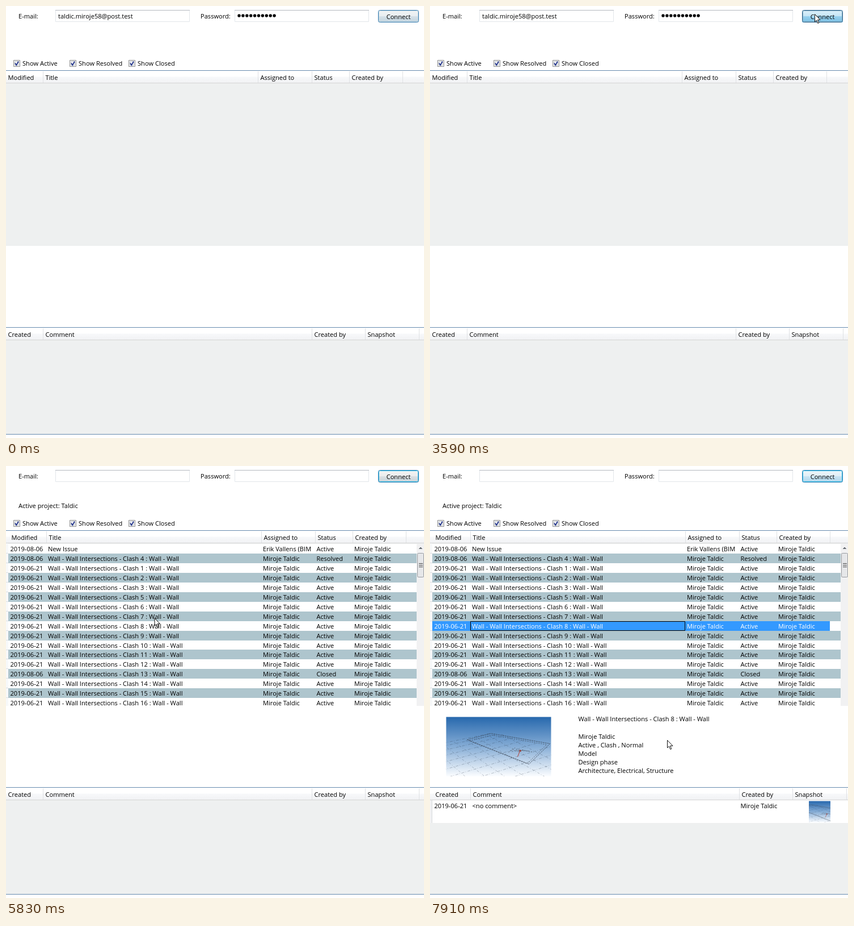
An HTML page with a canvas for the animation above (7.99 s loop, 737x760 px).

```html
<!DOCTYPE html>
<html lang="en">
<head>
<meta charset="utf-8">
<title>Issue list</title>
<style>
html, body { margin: 0; width: 100%; height: 100%; overflow: hidden; background: #fff; }
canvas { display: block; }
</style>
</head>
<body>
<canvas id="stage" width="737" height="760"></canvas>
<script>
const ctx = document.getElementById('stage').getContext('2d');
const LOOP = 7990, LOADED = 3750, SELECTED = 7110, RESIZED = 7190;
const PERSON = 'Miroje Taldic';
const ROW = 17, LINE = '#688caf', EMPTY = '#eef0f0';

const ramp = (t, from, to) => Math.min(1, Math.max(0, (t - from) / (to - from)));
const easeOut = f => 1 - (1 - f) ** 3;

function pointerAt(t) {
  let x = 688, y = 596;
  const move = (from, to, toX, toY, bow = 0) => {
    const f = easeOut(ramp(t, from, to));
    x += (toX - x) * f - bow * Math.sin(Math.PI * f);
    y += (toY - y) * f;
  };
  move(390, 1670, 678, 14, 86);
  move(4230, 5190, 271, 241);
  move(5430, 6710, 257, 280);
  move(7350, 7910, 418, 482);
  return [x, y];
}

// Hover fades in, then the default-button pulse takes over
const glow = t => .2 * (1 - ramp(t, 0, 230)) + ramp(t, 1750, 1990)
  - .35 * ramp(t, 4230, 4630) - .65 * ramp(t, 5430, 5590) + .65 * ramp(t, 6230, 6710);
const press = t => t < LOADED ? ramp(t, 2790, 2950) : 0;

function box(x, y, w, h, fill) {
  ctx.fillStyle = fill;
  ctx.fillRect(x, y, w, h);
}

function frame(x, y, w, h, color, radius = 0) {
  ctx.beginPath();
  ctx.roundRect(x + .5, y + .5, w - 1, h - 1, radius);
  ctx.strokeStyle = color;
  ctx.lineWidth = 1;
  ctx.stroke();
}

function text(s, x, y, color = '#000') {
  ctx.fillStyle = color;
  ctx.fillText(s, x, y);
}

function dot(x, y, r, color) {
  ctx.beginPath();
  ctx.arc(x, y, r, 0, 7);
  ctx.fillStyle = color;
  ctx.fill();
}

function polyline(points, color, width, dash = []) {
  ctx.beginPath();
  points.forEach(([x, y]) => ctx.lineTo(x, y));
  ctx.setLineDash(dash);
  ctx.strokeStyle = color;
  ctx.lineWidth = width;
  ctx.stroke();
  ctx.setLineDash([]);
}

function gradient(y, h, stops) {
  const g = ctx.createLinearGradient(0, y, 0, y + h);
  stops.forEach(([at, color]) => g.addColorStop(at, color));
  return g;
}

function clipped(x, y, w, h, draw) {
  ctx.save();
  ctx.beginPath();
  ctx.rect(x, y, w, h);
  ctx.clip();
  draw();
  ctx.restore();
}

function input(x) {
  box(x, 7, 237, 21, '#fff');
  frame(x, 7, 237, 21, '#e2e6ea');
  box(x, 7, 237, 1, '#b4b8bf');
}

function buttonSkin(alpha, a, b, c, d) {
  ctx.globalAlpha = alpha;
  ctx.beginPath();
  ctx.roundRect(656, 7, 72, 22, 3);
  ctx.fillStyle = gradient(8, 20, [[0, a], [.5, b], [.5, c], [1, d]]);
  ctx.fill();
  ctx.globalAlpha = 1;
}

function button(t) {
  const pressed = press(t) > 0;
  buttonSkin(1, '#f3f3f3', '#ebedee', '#dbe0e3', '#c9d3d9');
  buttonSkin(glow(t), '#eaf6fd', '#d9f0fc', '#bee6fd', '#a7d9f5');
  buttonSkin(press(t), '#dcf0fa', '#c4e5f6', '#98d1ef', '#7cc0e3');
  frame(656, 7, 72, 22, pressed ? '#2c628b' : '#3c7fb1', 3);
  frame(657, 8, 70, 20, t >= LOADED ? '#2fbfe8' : pressed ? '#7fa9c0' : '#b5d0df', 2);
  ctx.textAlign = 'center';
  text('Connect', 692, 23);
  ctx.textAlign = 'left';
}

function checkbox(x, label) {
  box(x, 95, 12, 12, '#f4f4f4');
  frame(x, 95, 12, 12, '#8e8f8f');
  frame(x + 2, 97, 8, 8, '#c3c8ce');
  polyline([[x + 3, 100.5], [x + 5.3, 104], [x + 9, 97.5]], '#23358c', 1.8);
  text(label, x + 16, 105);
}

function header(y, shift, columns) {
  box(0, y, 737, 1, LINE);
  box(0, y + 1, 737, 22, gradient(y + 1, 22, [[0, '#fff'], [.45, '#fff'], [.5, '#f7f8fa'], [1, '#f1f2f4']]));
  box(0, y + 22, 737, 1, '#d5d5d5');
  for (const [label, x] of columns) {
    if (x > 0) box(x + shift, y + 2, 1, 20, '#dfe1e4');
    text(label, x + shift + 4.5, y + 17);
  }
}

function issueRow(i, selected) {
  // Layout rounding makes an occasional row one pixel shorter
  const y = Math.floor(137.8 + i * 16.92), base = y + 13;
  const clash = i === 1 ? 4 : i < 5 ? i - 1 : i;
  const title = i ? `Wall - Wall Intersections - Clash ${clash} : Wall - Wall` : 'New Issue';
  const status = i === 1 ? 'Resolved' : i === 13 ? 'Closed' : 'Active';
  const edited = !i || status !== 'Active';
  const color = selected ? '#fff' : '#000';
  box(4, y, 720, ROW, i % 2 ? '#aec5cd' : '#fff');
  box(0, y + 16, 4, 1, '#dcdfe2');
  if (selected) {
    box(4, y, 701, ROW, '#3399ff');
    frame(71, y, 379, ROW, '#000');
  }
  text(edited ? '2019-08-06' : '2019-06-21', 7.5, base, color);
  text(title, 74, base, color);
  clipped(450, y, 92.5, ROW, () => text(i ? PERSON : 'Erik Vallens (BIM', 453, base, color));
  text(status, 547.5, base, color);
  text(PERSON, 614, base, color);
}

function scrollbar() {
  box(724, 137, 13, 285, '#f1f1f2');
  for (let i = 0; i < 3; i++) box(730 - i, 143 + i, 2 + i * 2, 1, '#6a6f75');
  box(725, 153, 12, 43, '#e6e7e9');
  frame(725, 153, 12, 43, '#979a9e', 2);
  for (let y = 171; y < 179; y += 3) box(728, y, 7, 1, '#444');
}

// Model view: a sky gradient over a perspective plan
function modelView(x, y, w, h, ox, oy, zoom) {
  box(x, y, w, h, gradient(y, h, [[0, '#2768ad'], [.5, '#86add6'], [1, '#fbfdff']]));
  clipped(x, y, w, h, () => {
    ctx.translate(x + ox, y + oy);
    ctx.scale(zoom, zoom);
    const faint = 'rgba(35,48,65,.4)';
    for (let i = 0; i < 9; i++) {
      const s = i * i * 1.6 + i * 8;
      polyline([[-15, 48 + s * .6], [78 + s, 29 + s * .22]], faint, .7, [5, 2, 1, 3]);
      polyline([[i * 21 - 70, 58 - i * 3.4], [i * 36 - 30, 112]], faint, .7, [4, 3, 1, 3]);
    }
    const outline = [[37, 40], [79, 29], [183, 47], [146, 83], [37, 40]];
    polyline(outline, '#333c48', .7, [3, 1]);
    polyline(outline.map(([a, b]) => [a * .93 + 7, b * .93 + 5]), '#3d4652', .7, [2, 2]);
    for (let i = 0; i < 5; i++)
      polyline([[110 + i * 6, 62 - i], [122 + i * 8, 54 + i * 2]], '#40454d', .7, [2, 2]);
    polyline([[130, 60], [126, 70]], '#b03c32', 1);
    box(129, 58, 3, 3, '#9b3a32');
  });
}

function details() {
  modelView(28.5, 441.5, 185, 104.5, 0, 0, 1);
  text('Wall - Wall Intersections - Clash 8 : Wall - Wall', 261.5, 449);
  [PERSON, 'Active , Clash , Normal', 'Model', 'Design phase', 'Architecture, Electrical, Structure']
    .forEach((s, i) => text(s, 261.5, 480 + i * 15.1));
  box(0, 588, 737, 40, '#fff');
  box(0, 588, 4, 40, '#f1f2f4');
  box(3, 588, 1, 40, '#d5d8db');
  text('2019-06-21', 7.5, 602);
  text('<no comment>', 74.5, 602);
  text(PERSON, 547.5, 602);
  modelView(668, 589.5, 38, 37.5, -40, -10, .55);
}

function pointer(t) {
  const [x, y] = pointerAt(t);
  if (t >= 2710 && t < 2870) dot(x, y, 11.5, 'rgba(255,255,0,.47)');
  ctx.beginPath();
  [[.5, .5], [.5, 14], [3.5, 11], [5.8, 16.5], [7.8, 15.6], [5.6, 10.3], [10, 10.3]]
    .forEach(([a, b]) => ctx.lineTo(x + a, y + b));
  ctx.closePath();
  ctx.fillStyle = '#fff';
  ctx.fill();
  ctx.strokeStyle = '#111';
  ctx.lineWidth = 1;
  ctx.stroke();
}

function draw(t) {
  const loaded = t >= LOADED, selected = t >= SELECTED;
  ctx.font = '11.1px "Open Sans", "Noto Sans", sans-serif';
  box(0, 0, 737, 760, '#fff');
  text('E-mail:', 22, 22);
  text('Password:', 343, 22);
  input(87);
  input(403);
  if (loaded) {
    text('Active project: Taldic', 22, 74);
  } else {
    text('taldic.miroje58@post.test', 92, 22);
    for (let i = 0; i < 10; i++) dot(411 + i * 6.9, 17, 2.7, '#000');
  }
  button(t);
  checkbox(13, 'Show Active');
  checkbox(112, 'Show Resolved');
  checkbox(216, 'Show Closed');

  box(0, 136, 737, 286, EMPTY);
  if (loaded) clipped(0, 136, 737, 286, () => {
    box(0, 136, 4, 286, '#f7f8f9');
    for (let i = 0; i < 17; i++) issueRow(i, selected && i === 8);
    scrollbar();
  });
  header(113, loaded ? 6 : 0, [['Modified', -1], ['Title', 65], ['Assigned to', 444],
    ['Status', 539], ['Created by', 605], ['', 699]]);

  box(0, 588, 737, 165, EMPTY);
  if (selected) details();
  header(565, t >= RESIZED ? 6 : 0, [['Created', -1], ['Comment', 65], ['Created by', 539],
    ['Snapshot', 633], ['', 728]]);
  box(0, 753, 737, 1, LINE);
  if (t >= 390) pointer(t);
}

// The screen was sampled every 80 ms, so motion advances in those steps
function tick(now) {
  const t = now % LOOP;
  draw(t < 70 ? 0 : 70 + Math.floor((t - 70) / 80) * 80);
  requestAnimationFrame(tick);
}
requestAnimationFrame(tick);
</script>
</body>
</html>
```
